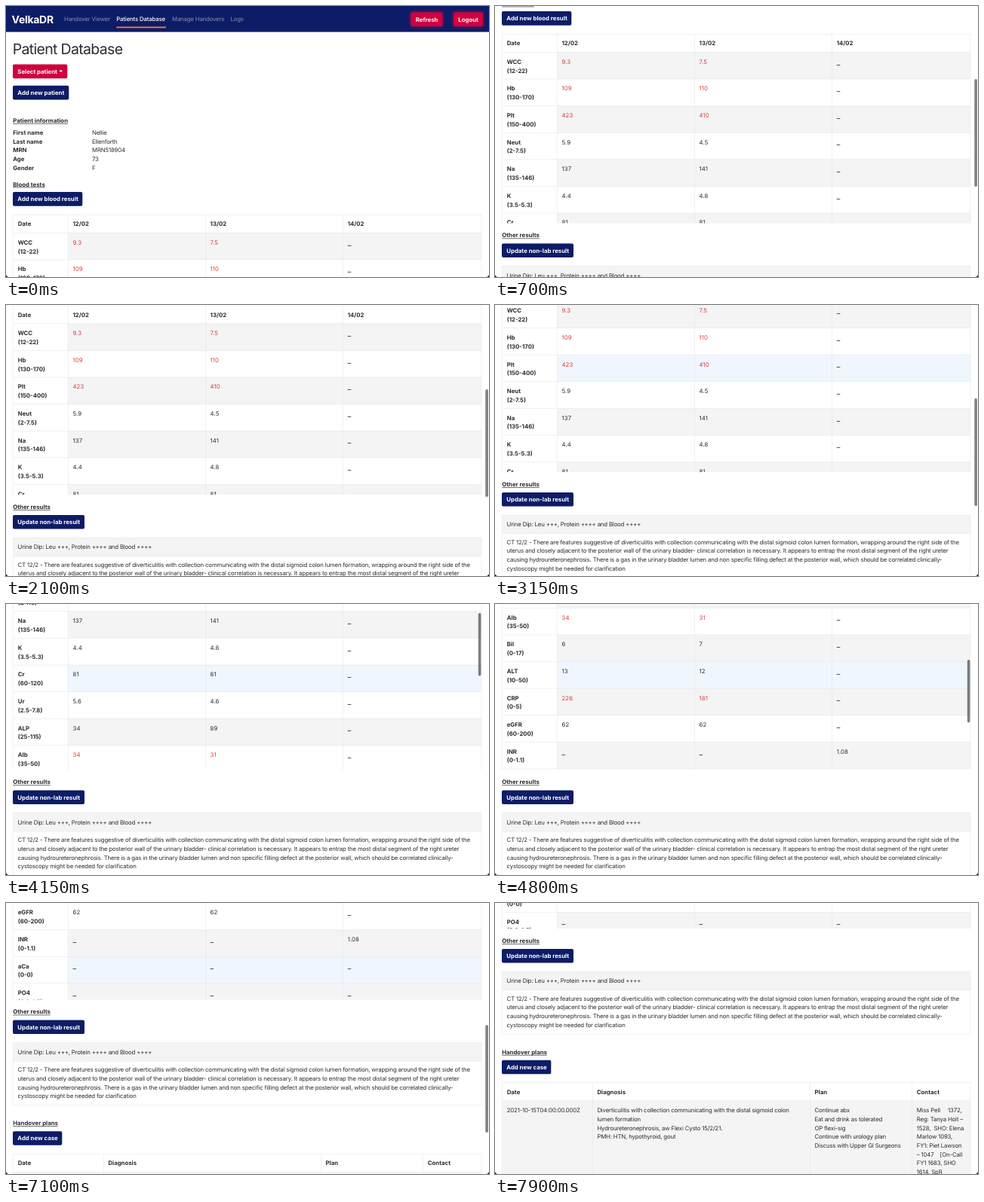
Animation of 640 by 360 pixels, one loop 8 s. Source, as an HTML page with a canvas:

```html
<!DOCTYPE html>
<html lang="en">
<head>
<meta charset="utf-8">
<title>Patient Database</title>
<style>
html, body { margin: 0; width: 100%; height: 100%; overflow: hidden; background: #fff; }
canvas { display: block; width: 640px; height: 360px; }
</style>
</head>
<body>
<canvas id="stage" width="640" height="360"></canvas>
<script>
const ctx = document.getElementById('stage').getContext('2d');
const LOOP = 8000, STEP = 50;
const NAVY = '#0d1c66', RED = '#d0003e', INK = '#2a2d31', ALERT = '#d93c3f';
const STRIPE = '#f4f4f4', HOVER = '#f0f6fd', LINE = '#dee2e6', PICK = '#b5d5fd';
const SIZE = 7.8, LEAD = 11.75;

// Blood table geometry in page coordinates
const LAB = { top: 277.4, head: 24, row: 35.61, height: 251.2, cols: [9.5, 82.3, 264.4, 446.5, 630] };
const POINTER_Y = 87;

const labs = [
  ['WCC', '12-22', '9.3', '7.5', '_', 1],
  ['Hb', '130-170', '109', '110', '_', 1],
  ['Plt', '150-400', '423', '410', '_', 1],
  ['Neut', '2-7.5', '5.9', '4.5', '_'],
  ['Na', '135-146', '137', '141', '_'],
  ['K', '3.5-5.3', '4.4', '4.8', '_'],
  ['Cr', '60-120', '81', '81', '_'],
  ['Ur', '2.5-7.8', '5.6', '4.6', '_'],
  ['ALP', '25-115', '34', '89', '_'],
  ['Alb', '35-50', '34', '31', '_', 1],
  ['Bil', '0-17', '6', '7', '_'],
  ['ALT', '10-50', '13', '12', '_'],
  ['CRP', '0-5', '226', '181', '_', 1],
  ['eGFR', '60-200', '62', '62', '_'],
  ['INR', '0-1.1', '_', '_', '1.08'],
  ['aCa', '0-0', '_', '_', '_'],
  ['PO4', '0.8-1.5', '_', '_', '_']
];
const CRP = 12;

const patient = [
  ['First name', 'Nellie'],
  ['Last name', 'Ellenforth'],
  ['MRN', 'MRN518904'],
  ['Age', '73'],
  ['Gender', 'F']
];

const scan = [
  'CT 12/2 - There are features suggestive of diverticulitis with collection communicating with the distal sigmoid colon lumen formation, wrapping around the right side of the',
  'uterus and closely adjacent to the posterior wall of the urinary bladder- clinical correlation is necessary. It appears to entrap the most distal segment of the right ureter',
  'causing hydroureteronephrosis. There is a gas in the urinary bladder lumen and non specific filling defect at the posterior wall, which should be correlated clinically-',
  'cystoscopy might be needed for clarification'
];

const plan = [
  ['Date', 9.5, ['2021-10-15T04:00:00.000Z']],
  ['Diagnosis', 129.2, [
    'Diverticulitis with collection communicating with the distal sigmoid colon',
    'lumen formation',
    'Hydroureteronephrosis, aw Flexi Cysto 15/2/21.',
    'PMH: HTN, hypothyroid, gout']],
  ['Plan', 417.3, [
    'Continue abx', 'Eat and drink as tolerated', 'OP flexi-sig',
    'Continue with urology plan', 'Discuss with Upper GI Surgeons']],
  ['Contact', 552.6, [
    'Miss Pell\u00a0\u00a0\u00a0\u00a0\u00a01372,', 'Reg: Tanya Holt –', '1528,\u00a0 SHO: Elena',
    'Marlow 1093,', 'FY1: Piet Lawson', '– 1047\u00a0\u00a0\u00a0 [On-Call', 'FY1 1683, SHO', '1614, SpR']]
];

// Scroll positions: [ms, px]
const pageKeys = [
  [0, 0], [50, 35], [250, 165], [500, 165], [700, 240], [800, 240], [850, 265], [1100, 265],
  [1450, 348], [1550, 354], [1900, 279], [1950, 276.6], [2200, 276.6], [2300, 272], [2650, 272],
  [2750, 290], [2950, 302], [3150, 306.5], [3350, 308], [6800, 308], [7100, 400], [7400, 480], [7600, 494.5]
];
const labKeys = [
  [3600, 0], [3700, 22], [3800, 22], [4150, 126], [4200, 126], [4350, 190],
  [4450, 190], [4650, 290], [4750, 290], [4950, 364.4]
];

function at(keys, t) {
  if (t <= keys[0][0]) return keys[0][1];
  for (let i = 1; i < keys.length; i++) {
    const [t0, v0] = keys[i - 1], [t1, v1] = keys[i];
    if (t <= t1) return v0 + (v1 - v0) * (t - t0) / (t1 - t0);
  }
  return keys[keys.length - 1][1];
}

function rect(x, y, w, h, color) {
  ctx.fillStyle = color;
  ctx.fillRect(x, y, w, h);
}

function pill(x, y, w, h, r, color) {
  ctx.fillStyle = color;
  ctx.beginPath();
  ctx.roundRect(x, y, w, h, r);
  ctx.fill();
}

// Text is placed by the vertical middle of its capitals
function text(str, x, mid, { color = INK, weight = 400, size = SIZE, track = -0.021 } = {}) {
  ctx.font = `${weight} ${size}px Inter, sans-serif`;
  ctx.letterSpacing = `${track * size}px`;
  ctx.fillStyle = color;
  ctx.fillText(str, x, mid + size * 0.36);
  return ctx.measureText(str).width;
}

const bold = (str, x, mid, color = INK) => text(str, x, mid, { weight: 700, color, track: 0 });

// Blanks are set larger, which makes them wider and lower
function labValue(str, x, mid, alert) {
  if (str === '_') text(str, x, mid, { size: 10 });
  else text(str, x, mid, { color: alert ? ALERT : INK, track: 0.01 });
}

function heading(str, mid) {
  const w = bold(str, 9.2, mid);
  rect(9.2, mid + 3.9, w, 0.7, INK);
}

function button(str, x, y, w, color, glow) {
  ctx.save();
  if (glow) {
    ctx.shadowColor = 'rgba(240, 0, 70, .8)';
    ctx.shadowBlur = 4;
  }
  pill(x, y, w, 18.6, 2, color);
  ctx.restore();
  bold(str, x + 6.3, y + 9.3, '#fff');
}

const hline = (x0, x1, y) => rect(x0, y - 0.25, x1 - x0, 0.5, LINE);
const vline = (x, y0, y1) => rect(x - 0.25, y0, 0.5, y1 - y0, LINE);

function drawTop() {
  rect(0, 0, 640, 34.5, NAVY);
  text('VelkaDR', 7.6, 17.6, { color: '#fff', weight: 700, size: 14 });
  const dim = { color: '#858cb1' };
  text('Handover Viewer', 77, 17.5, dim);
  text('Patients Database', 146.3, 17.5, { color: '#fff', weight: 500 });
  text('Manage Handovers', 220, 17.5, dim);
  text('Logs', 297.5, 17.5, dim);
  rect(146.3, 27.4, 65.7, 1.9, '#e8735a');
  button('Refresh', 536.5, 8.5, 42, RED, true);
  button('Logout', 593, 8.5, 39, RED, true);

  text('Patient Database', 8.8, 56.6, { size: 19.5, track: -0.035 });
  button('Select patient', 9, 77.6, 72.3, RED);
  ctx.fillStyle = '#fff';
  ctx.beginPath();
  ctx.moveTo(70.3, 85.4);
  ctx.lineTo(75.1, 85.4);
  ctx.lineTo(72.7, 87.9);
  ctx.fill();
  button('Add new patient', 9, 105.8, 74.3, NAVY);

  heading('Patient information', 152);
  patient.forEach(([name, value], i) => {
    const mid = 168.3 + i * 11.68;
    bold(name, 9.2, mid);
    text(value, 114, mid);
  });
  heading('Blood tests', 236.7);
  button('Add new blood result', 9, 247.1, 92.3, NAVY);
}

function drawLabs(page, scroll, t) {
  const { top, head, row, height, cols } = LAB;
  const left = cols[0], right = cols[4];
  ctx.save();
  ctx.beginPath();
  ctx.rect(0, top - 0.5, 640, height + 0.5);
  ctx.clip();
  ctx.translate(0, -scroll);

  hline(left, right, top);
  ['Date', '12/02', '13/02', '14/02'].forEach((s, i) => bold(s, cols[i] + 6.2, top + 12.1));

  labs.forEach(([name, range, a, b, c, high], i) => {
    const y = top + head + i * row;
    const seen = y - scroll - page;
    const hover = t >= 2950 && seen <= POINTER_Y && seen + row > POINTER_Y;
    if (hover || i % 2 === 0) rect(cols[1], y, right - cols[1], row, hover ? HOVER : STRIPE);
    hline(left, right, y);
    const mid = y + 12.6;
    if (i === CRP) drawPick(mid, t);
    bold(name, cols[0] + 6.2, mid);
    bold(`(${range})`, cols[0] + 6.2, mid + LEAD);
    [a, b, c].forEach((v, j) => labValue(v, cols[j + 1] + 6.2, mid, high));
  });

  const end = top + head + labs.length * row;
  cols.forEach(x => vline(x, top, end));
  ctx.restore();
}

// Text selection dragged across the CRP values
function drawPick(mid, t) {
  if (t < 5350 || t >= 6100) return;
  const y = mid - 5.7, h = 11.6;
  rect(88.5, y, t < 5750 ? 14.5 : 16, h, PICK);
  if (t >= 5750) rect(270.3, y, t < 6000 ? 8.5 : 12, h, PICK);
}

function drawResults() {
  heading('Other results', 544.6);
  button('Update non-lab result', 9, 555.5, 95, NAVY);
  const top = 585.6, mid = 610.1, end = 668.6;
  rect(9.5, top, 620.5, mid - top, STRIPE);
  [top, mid, end].forEach(y => hline(9.5, 630, y));
  [9.5, 630].forEach(x => vline(x, top, end));
  text('Urine Dip: Leu +++, Protein ++++ and Blood ++++', 15.6, 597.8);
  scan.forEach((s, i) => text(s, 15.6, 621.3 + i * 11.7));
}

function drawPlans() {
  heading('Handover plans', 692.4);
  button('Add new case', 9, 703.2, 65.3, NAVY);
  const top = 733.2, body = 757.4, end = 880;
  rect(9.5, body, 620.5, end - body, STRIPE);
  hline(9.5, 630, top);
  hline(9.5, 630, body);
  vline(630, top, end);
  plan.forEach(([title, x, lines]) => {
    vline(x, top, end);
    bold(title, x + 6.2, 745.6);
    lines.forEach((s, i) => text(s, x + 6.2, 769.8 + i * 11.7));
  });
}

function drawBars(page, scroll, t) {
  const gray = a => `rgba(0, 0, 0, ${a})`;
  if ((t >= 50 && t < 3650) || (t >= 6850 && t < 7900)) {
    pill(635.3, page * 0.4055 - 0.2, 3.6, 143, 1.8, gray(t >= 7800 ? 0.25 : 0.5));
  }
  if (t >= 3650 && t < 6850) {
    pill(625.8, LAB.top - page - 0.2 + scroll * 0.34, 3.6, 83.5, 1.8, gray(0.5));
  }
}

function drawCorners() {
  ctx.fillStyle = '#000';
  ctx.beginPath();
  ctx.rect(0, 0, 640, 360);
  ctx.roundRect(0, 0, 640, 360, [0, 0, 4, 4]);
  ctx.fill('evenodd');
}

function draw(now) {
  const t = Math.floor(now % LOOP / STEP) * STEP;
  const page = at(pageKeys, t), scroll = at(labKeys, t);
  ctx.textRendering = 'geometricPrecision';
  rect(0, 0, 640, 360, '#fff');
  ctx.save();
  ctx.translate(0, -page);
  drawTop();
  drawLabs(page, scroll, t);
  drawResults();
  drawPlans();
  ctx.restore();
  drawBars(page, scroll, t);
  drawCorners();
}

let start;
function tick(now) {
  start ??= now;
  draw(now - start);
  requestAnimationFrame(tick);
}
draw(0);
requestAnimationFrame(tick);
</script>
</body>
</html>
```
